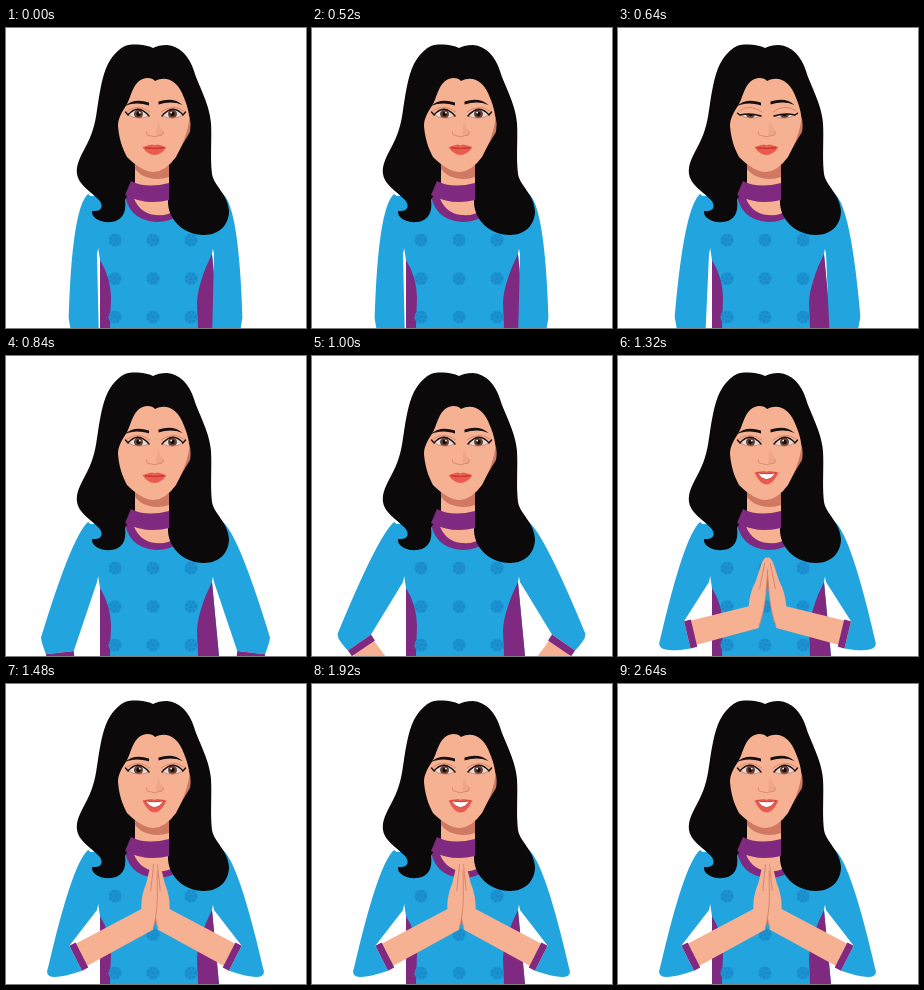
Recreate the animation shown at these times as an HTML page. Size 300x300 px, loop 4.04 s.

```html
<!DOCTYPE html>
<html lang="en">
<head>
<meta charset="utf-8">
<title>Greeting</title>
<style>
html, body { margin: 0; width: 100%; height: 100%; overflow: hidden; background: #fff; }
svg { display: block; width: 100vw; height: 100vh; }
.blue { fill: #22a5de; }
.purple { fill: #7f2980; }
.skin { fill: #f6b092; }
.hair { fill: #0b0909; }
.line { fill: none; stroke: #d27f66; stroke-width: .8; stroke-linecap: round; }
</style>
</head>
<body>
<svg viewBox="0 0 300 300">
  <defs>
    <clipPath id="eyeClip"><path id="eyeHole"/></clipPath>
    <g id="button">
      <circle r="6.6" fill="#1c94d3"/>
      <circle r="4.4" fill="none" stroke="#1a86c6" stroke-width="3" stroke-dasharray="1.2 2.4"/>
      <circle r="1.4" fill="#1a86c6"/>
    </g>
  </defs>

  <path class="blue" d="M84 168L94 232V300H213L206 226L216 168Z"/>
  <path class="purple" d="M94 232Q105 250 105 270L104 300H94Z"/>
  <path class="purple" d="M206 226C198 242 191 262 191 275L192 300H213Z"/>
  <g id="buttons"></g>

  <path id="sleeve" class="blue"/>
  <use href="#sleeve" transform="translate(299 0) scale(-1 1)"/>

  <path class="purple" d="M118 160Q120 192 150 194Q166 194 172 186L168 160Z"/>
  <path class="skin" d="M126 165Q132 186 150 187Q162 188 168 183L164 165Z"/>
  <path class="hair" d="M147 20C141 17 127 15 119 18C109 23 102 33 98 46C94 60 93 70 91 82C89 97 86 107 79 120C73 131 70 138 71 146C72 156 84 163 93 172C98 178 96 184 86 183C85 190 95 195 105 194C114 193 121 187 119 172L128 155H163L162 174C162 190 176 207 198 207C214 207 223 196 223 183C222 166 208 158 206 146C204 128 206 112 205 95C203 74 192 57 188 43C183 28 174 18 161 17C155 17 151 18 147 20Z"/>
  <path class="skin" d="M129 125H163V160H129Z"/>
  <path d="M129 125H163V149Q151 153 140 149Q133 146 129 141Z" fill="#cf7862"/>
  <path class="purple" d="M125 153Q140 161 163 155V172Q140 178 119 167Z"/>

  <path d="M176 74Q187 88 184 104L172 124Z" fill="#cb7762"/>
  <path class="skin" d="M149 53C146 49 137 49 132 54C126 60 125 68 121 76C116 84 112 90 112 98C113 110 116 120 121 129Q136 144 148 144Q160 143 170 129C176 118 181 106 183 94C184 84 180 74 176 65C171 53 160 47 149 53Z"/>

  <path id="brow" d="M119 78Q128 69.500 143 74.500L143 77.500Q130 73.500 119 78Z" fill="#15100f"/>
  <use href="#brow" transform="translate(295.500 -1) scale(-1 1)"/>

  <g id="eye">
    <path d="M121 83Q132 75 144 84" class="line"/>
    <path id="eyeWhite" fill="#e3dad6"/>
    <g clip-path="url(#eyeClip)">
      <circle cx="132.500" cy="86" r="4.500" fill="#6b4135"/>
      <circle cx="132.500" cy="86" r="2.200" fill="#140c0a"/>
      <circle cx="133.800" cy="84.600" r=".9" fill="#fff"/>
    </g>
    <path id="lowerLid" class="line"/>
    <path id="lash" fill="none" stroke="#17100f" stroke-width="1.400" stroke-linecap="round"/>
  </g>
  <use href="#eye" transform="translate(299 0) scale(-1 1)"/>

  <path d="M152 92Q153 100 158 103Q159 107 155 108L150 107Z" fill="#eea688"/>
  <path class="line" d="M140.500 104Q140 107.500 143.500 107.500Q148.500 110 153.500 107.500Q157.500 107.500 157 104"/>

  <path id="lips" fill="#ea5a4e"/>
  <path id="teeth" fill="#fff" stroke="#c2362e" stroke-width=".9"/>

  <use href="#hand" transform="translate(299 0) scale(-1 1)"/>
  <g id="hand">
    <path id="forearm" class="skin"/>
    <g id="palm">
      <path class="skin" d="M-9 -10C-10 -20 -9 -28 -6 -37L-3 -55Q-1 -62 1 -62Q4 -61 4 -50L6 -25Q7 -5 4 9L-6 4Z"/>
      <path class="line" d="M4 -50L6 -25Q7 -5 4 7M0 -56L-1 -30"/>
    </g>
    <path id="cuff" class="purple"/>
  </g>
</svg>
<script>
const LOOP = 4040, STEP = 40;
const $ = id => document.getElementById(id);
const setPath = (id, d) => $(id).setAttribute('d', d);
const mix = (a, b, k) => a + (b - a) * k;
const ramp = (t, from, to) => Math.max(0, Math.min(1, (t - from) / (to - from)));
const smooth = k => k * k * (3 - 2 * k);
const ease = k => (1 - Math.cos(Math.PI * k)) / 2;

// Points are [x, y]; angles run from straight down (0) towards the body's middle.
const heading = deg => [Math.sin(deg * Math.PI / 180), Math.cos(deg * Math.PI / 180)];
const add = (p, d, k) => [p[0] + d[0] * k, p[1] + d[1] * k];
const poly = points => 'M' + points.map(p => p.join(' ')).join('L') + 'Z';

function drawArm(t) {
  const swing = 11 + 20 * smooth(ramp(t, 520, 1000)) - 9 * smooth(ramp(t, 1040, 1320));
  const fold = ease(ramp(t, 520, 1480) ** 1.3);

  const upper = heading(-swing);
  const along = heading(mix(-11, 117, fold));
  const across = [along[1], -along[0]];
  const elbow = add([84, 180], upper, 112);
  const corner = add(elbow, upper, 18 * fold);
  const low = add(add(elbow, along, mix(16, 29, fold)), across, mix(6, -18, fold));
  const high = add(low, across, 28);
  setPath('sleeve', `M82 166Q66 180 ${elbow}Q${corner} ${low}L${high}L91 226L100 180Z`);
  setPath('cuff', poly([low, high, add(high, along, 7), add(low, along, 7)]));

  const wrist = add(add(low, across, 14), along, 40 + 43 * fold ** 3);
  const turn = 4 + 178 * (1 - fold) ** 1.6;
  const [s, c] = heading(turn);
  const local = (x, y) => [wrist[0] + x * c - y * s, wrist[1] + x * s + y * c];
  const edge = k => add(add(low, across, k), along, 6);
  setPath('forearm', poly([edge(27), local(-9, -11), local(4, -8), local(4, 9), edge(2)]));
  $('palm').setAttribute('transform', `translate(${wrist}) rotate(${turn})`);
}

function drawEyes(t) {
  const sinceBlink = Math.min(...[560, 1800, 2520].map(b => t < b ? LOOP : t - b));
  const lid = sinceBlink < 3 * STEP ? 1 - .4 * Math.abs(sinceBlink / STEP - 1) : 0;
  const top = mix(75, 91, lid);
  const upper = `M122 87Q132 ${top} 143 88`;
  const lower = 'Q132 93 122 87';
  setPath('eyeHole', upper + lower);
  setPath('eyeWhite', upper + lower);
  setPath('lowerLid', 'M143 88' + lower);
  setPath('lash', `M119.500 ${mix(84, 86, lid)}L122 87Q132 ${top} 143 88`);
}

function drawMouth(open) {
  const y = mix(119.3, 116.5, open), top = mix(116.6, 115, open), base = mix(127, 128.5, open);
  setPath('lips', `M136.5 ${y}Q144 ${top} 146 ${top}Q148.5 ${top + 1.6} 151 ${top}` +
    `Q153 ${top} 160.5 ${y}Q155 ${base} 148.5 ${base}Q142 ${base} 136.5 ${y}Z`);
  setPath('teeth', `M139 ${y + .5}Q148.5 ${y + 2} 158 ${y + .5}Q148.5 ${y + 2 + 12 * open} 139 ${y + .5}Z`);
}

function render(time) {
  const t = Math.floor(time % LOOP / STEP) * STEP;
  drawArm(t);
  drawEyes(t);
  drawMouth(ramp(t, 1160, 1320));
}

for (let i = 0; i < 9; i++)
  $('buttons').insertAdjacentHTML('beforeend',
    `<use href="#button" x="${109 + i % 3 * 38}" y="${212 + Math.floor(i / 3) * 38.5}"/>`);

const begin = performance.now();
function tick() {
  render(performance.now() - begin);
  requestAnimationFrame(tick);
}
tick();
</script>
</body>
</html>
```
